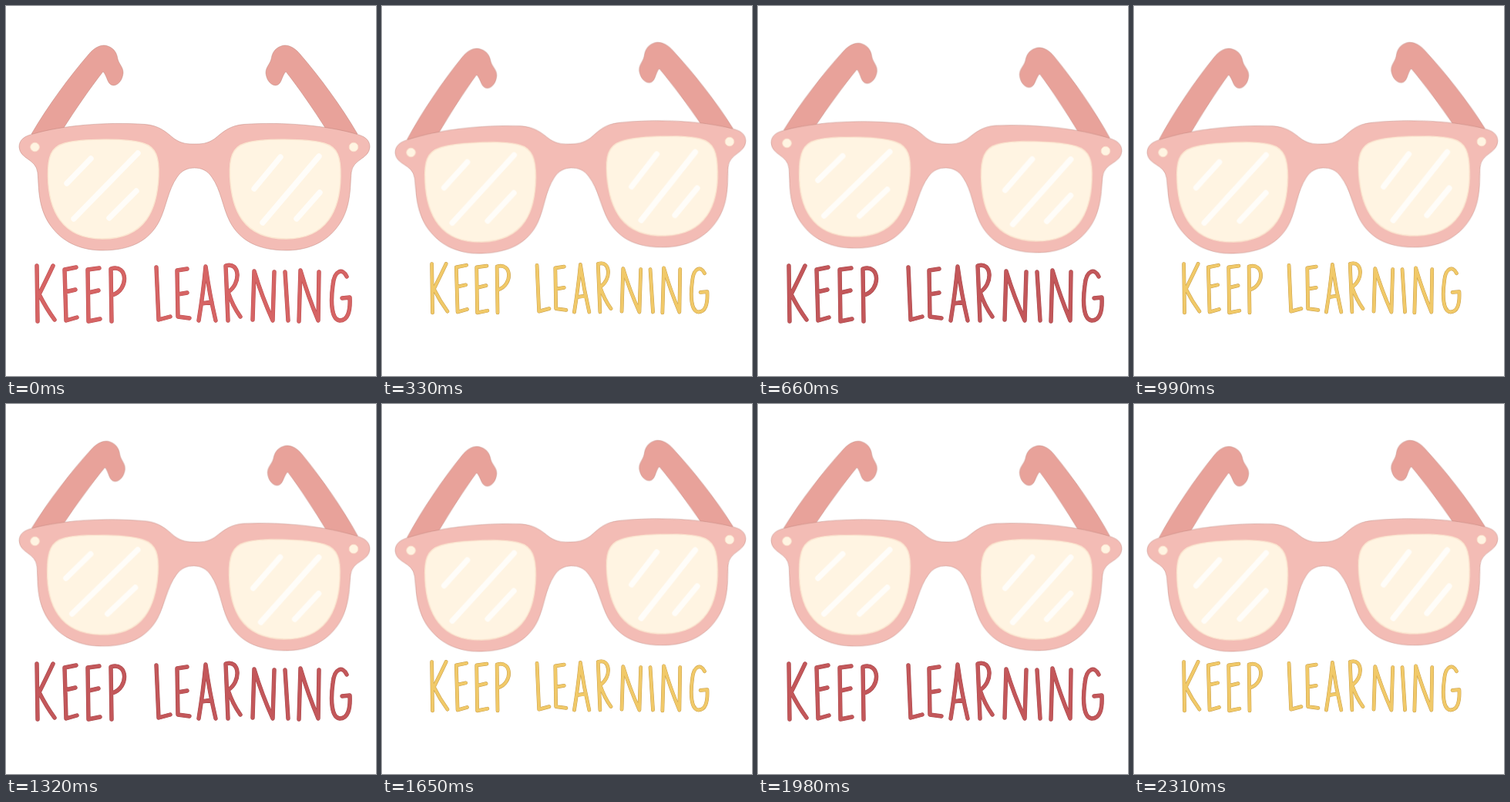
An HTML page for the animation above (2.64 s loop, 480 by 480 pixels).

```html
<!DOCTYPE html>
<html lang="en">
<head>
<meta charset="utf-8">
<title>Keep learning</title>
<style>
html, body { margin: 0; width: 100%; height: 100%; overflow: hidden; background: #fff; }
svg { display: block; width: 100vw; height: 100vh; }
#glasses { transform-origin: 244.5px 183px; }
#words { transform-origin: 37px 333px; fill: none; stroke-linecap: round; stroke-linejoin: round; }
.edge { stroke: #b97f78; stroke-width: .6; stroke-opacity: .75; }
.shine { fill: none; stroke: #fffdf9; stroke-width: 7.4; stroke-linecap: round; }
</style>
</head>
<body>
<svg viewBox="0 0 480 480" role="img" aria-label="Keep learning">
  <defs>
    <path id="temple" class="edge" fill="#e8a29a" d="M33 166 C54 130 82 92 107 63 C115 53 125 49 132 52
      C141 55 144 62 145 69 C147 76 152 79 152 87 C151 97 145 103 139 103
      C131 102 132 92 126 85 C108 108 91 133 73 161 L60 175 Z"/>
    <path id="lens" fill="#fff4e2" stroke="#fbe6d0" stroke-width="1.4" d="M76 178 C98 172 157 171 178 178
      C195 183 199 197 198 221 C196 263 182 302 125 302 C72 302 55 264 54.500 221 C54 196 58 183 76 178 Z"/>
    <circle id="rivet" cx="37.500" cy="183" r="5.800" fill="#fff4e2" stroke="#fbe0cc"/>
  </defs>
  <g id="glasses">
    <use href="#temple"/>
    <use href="#temple" transform="matrix(-1 0 0 1 489 0)"/>
    <path id="rim" class="edge" fill="#f3bcb5"/>
    <use href="#lens"/>
    <use href="#lens" transform="matrix(-1 0 0 1 488.500 0)"/>
    <use href="#rivet"/>
    <use href="#rivet" transform="matrix(-1 0 0 1 488.500 0)"/>
    <path class="shine" d="M79 230 L110 198 M88 276 L171 191 M134 275 L169 240
      M322 237 L356 196 M333 281 L406 195 M377 276 L407 242"/>
  </g>
  <g id="words">
    <path id="shade" stroke-width="5.400"/>
    <path id="ink" stroke-width="4.400"/>
  </g>
</svg>
<script>
const $ = id => document.getElementById(id);

// Left half of the rim as cubic points; the right half is its mirror image.
const half = [
  [244.5, 179], [236, 179], [228, 179], [218, 172], [207, 163], [199, 155], [180, 153.5],
  [130, 150], [72, 155], [35, 166], [23, 169], [17, 174], [17, 183],
  [18, 199], [39, 198], [41, 216], [43, 233], [40, 264], [61, 289],
  [77, 309], [101, 317], [125, 317], [160, 317], [185, 306], [199, 279],
  [208, 261], [210, 239], [222, 222], [228, 213], [236, 210], [244.5, 210]
];
const mirrored = half.map(([x, y]) => [489 - x, y]).reverse();
$('rim').setAttribute('d', `M${half[0]}C${half.slice(1).join(' ')}C${mirrored.slice(1).join(' ')}Z`);

const letters = [
  'M40 337 L41 409 M61 337 Q53 354 43 374 Q52 392 63 407',       // K
  'M91 339 L76 342 L78 408 L92 404 M77 371 L90 368',             // E
  'M121 340 L106 342 L107 409 L122 406 M107 372 L120 369',       // E
  'M137 409 L136 341 C158 334 160 368 138 375',                  // P
  'M195 339 L198 407 L213 403',                                  // L
  'M235 341 L222 343 L223 403 L238 405 M223 374 L235 372',       // E
  'M250 408 Q256 371 259 338 Q264 374 272 408 M254 386 L267 384', // A
  'M288 408 L285 337 C304 331 305 361 288 371 Q294 389 304 403', // R
  'M320 407 L322 344 Q332 377 346 408 L348 345',                 // N
  'M362 345 L366 408',                                           // I
  'M380 409 L382 343 Q392 377 405 408 L406 345',                 // N
  'M442 351 C437 340 426 342 424 362 C421 384 422 407 433 408 C443 408 447 397 446 378 L436 379' // G
].join(' ');
for (const id of ['shade', 'ink']) $(id).setAttribute('d', letters);

const level = { tilt: 0, x: 0, y: 0, size: 1, ink: '#d66464', shade: '#b94d50' };
const big = { tilt: 1.4, x: 0, y: 0, size: 1, ink: '#c3575a', shade: '#a5474a' };
const small = { tilt: -1.95, x: 25, y: -2, size: .88, ink: '#f1c968', shade: '#c39a48' };
const steps = [level, small, big, small, big, small, big, small];

function play(id, style) {
  const frames = [...steps, steps[0]].map((s, i) => ({
    ...style(s), offset: i / steps.length, easing: 'steps(1, end)'
  }));
  $(id).animate(frames, { duration: 330 * steps.length, iterations: Infinity });
}

play('glasses', s => ({ transform: `rotate(${s.tilt}deg)` }));
play('words', s => ({ transform: `translate(${s.x}px, ${s.y}px) scale(${s.size})` }));
play('ink', s => ({ stroke: s.ink }));
play('shade', s => ({ stroke: s.shade }));
</script>
</body>
</html>
```
